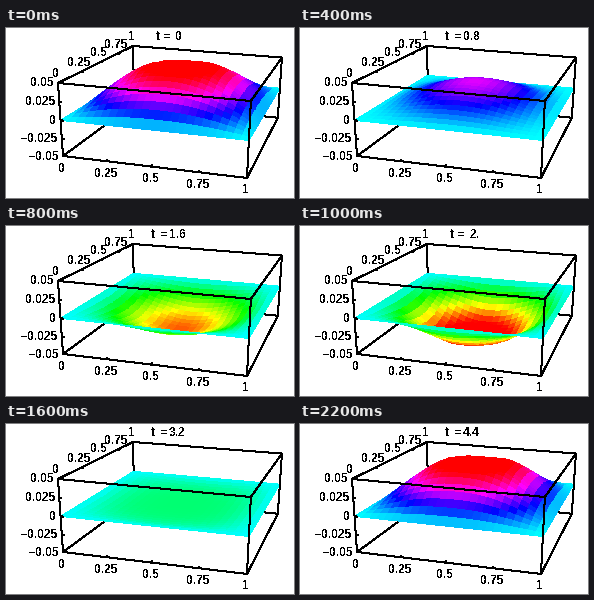
Animation, 288 px wide and 170 px high, one loop 2300 ms. Source, as a matplotlib script:

```python
import numpy as np
import matplotlib.pyplot as plt
from matplotlib.animation import FuncAnimation
from matplotlib.collections import LineCollection, PolyCollection
from matplotlib.colors import hsv_to_rgb

W, H, DPI = 288, 170, 100
FRAMES, STEP_MS = 23, 100
CELLS = 24
Z_MAX = 0.05
PX = 72 / DPI  # one pixel in points

plt.rcParams["font.family"] = "Liberation Sans"
plt.rcParams["text.antialiased"] = False


def project(x, y, z):
    """Perspective view of the unit box, in pixels from the top left."""
    w = 1 - 0.0625 * x + 0.295 * y - 0.0453 * z
    px = (57 + 168.9 * x + 109.1 * y - 7.4 * z) / w
    py = (128 + 12.6 * x - 30 * y - 75.5 * z) / w
    return px, py


def membrane(t):
    """Square membrane released at rest from x(1-x)y(1-y)."""
    s = np.linspace(0, 1, CELLS + 1)
    u = np.zeros((CELLS + 1, CELLS + 1))
    for m in range(1, 12, 2):
        for n in range(1, 12, 2):
            amp = 64 / (np.pi**6 * m**3 * n**3)
            u += (amp * np.cos(np.hypot(m, n) * t)
                  * np.outer(np.sin(n * np.pi * s), np.sin(m * np.pi * s)))
    return np.clip(u, -Z_MAX, Z_MAX)


def facets(t):
    """Quads from back to front and their hue colours."""
    u = membrane(t) / (2 * Z_MAX) + 0.5
    s = np.linspace(0, 1, CELLS + 1)
    x, y = np.meshgrid(s, s)
    p = np.stack(project(x, y, u), axis=-1)[::-1]
    u = u[::-1]

    def corners(a):
        return np.stack([a[:-1, :-1], a[:-1, 1:], a[1:, 1:], a[1:, :-1]], axis=2)

    quads = corners(p).reshape(-1, 4, 2)
    hue = corners(u).mean(axis=2).ravel() % 1
    one = np.ones_like(hue)
    return quads, hsv_to_rgb(np.column_stack([hue, one, one]))


fig = plt.figure(figsize=(W / DPI, H / DPI), dpi=DPI, facecolor="white")
ax = fig.add_axes([0, 0, 1, 1])
ax.set_xlim(0, W)
ax.set_ylim(H, 0)
ax.axis("off")


def label(x, y, s, ha="center"):
    return ax.text(x, y, s, ha=ha, va="center_baseline", color="black",
                   fontsize=12 * PX, fontweight="bold")


def draw_lines(pairs, zorder):
    segs = [[project(*a), project(*b)] for a, b in pairs]
    ax.add_collection(LineCollection(segs, colors="black", linewidths=PX,
                                     antialiaseds=False, zorder=zorder))


# Box edges: the three meeting at the far lower corner lie behind the surface
far = (0, 1, 0)
back, front = [], []
for axis in range(3):
    for i in (0, 1):
        for j in (0, 1):
            a, b = [i, j], [i, j]
            a.insert(axis, 0)
            b.insert(axis, 1)
            hidden = far in (tuple(a), tuple(b))
            (back if hidden else front).append((a, b))

# Axis ticks and their labels
for k in range(5):
    v = k / 4
    front += [((v, 0, 0), (v, 0, 0.03)),
              ((0, v, 1), (0.015, v, 1)),
              ((0, 0, v), (0.015, 0, v))]
    name = f"{v:g}"
    x, y = project(v, 0, 0)
    label(x - 1, y + 11, name)
    x, y = project(0, v, 1)
    label(x - 1.7, y - 10.5, name)
    x, y = project(0, 0, v)
    height = f"{(k - 2) * 0.025:g}".replace("-", "\u2212")
    label(x - 4, y - 1, height, "right")

draw_lines(back, 1)
draw_lines(front, 3)
surface = PolyCollection([], antialiaseds=False, linewidths=0, zorder=2)
ax.add_collection(surface)
title = [label(0, 8, s, "left") for s in ("t", "=", "")]


def update(i):
    quads, colors = facets(i / 5)
    surface.set_verts(quads)
    surface.set_facecolor(colors)
    whole = i % 5 == 0
    value = f"{i / 5:g}" + ("." if whole and i else "")
    title[2].set_text(value)
    for part, x in zip(title, (149.5, 157, 170) if whole else (145, 154.5, 163)):
        part.set_x(x)
    return [surface, *title]


anim = FuncAnimation(fig, update, frames=FRAMES, interval=STEP_MS,
                     init_func=lambda: update(0), repeat=True, repeat_delay=0)
plt.show()
```
